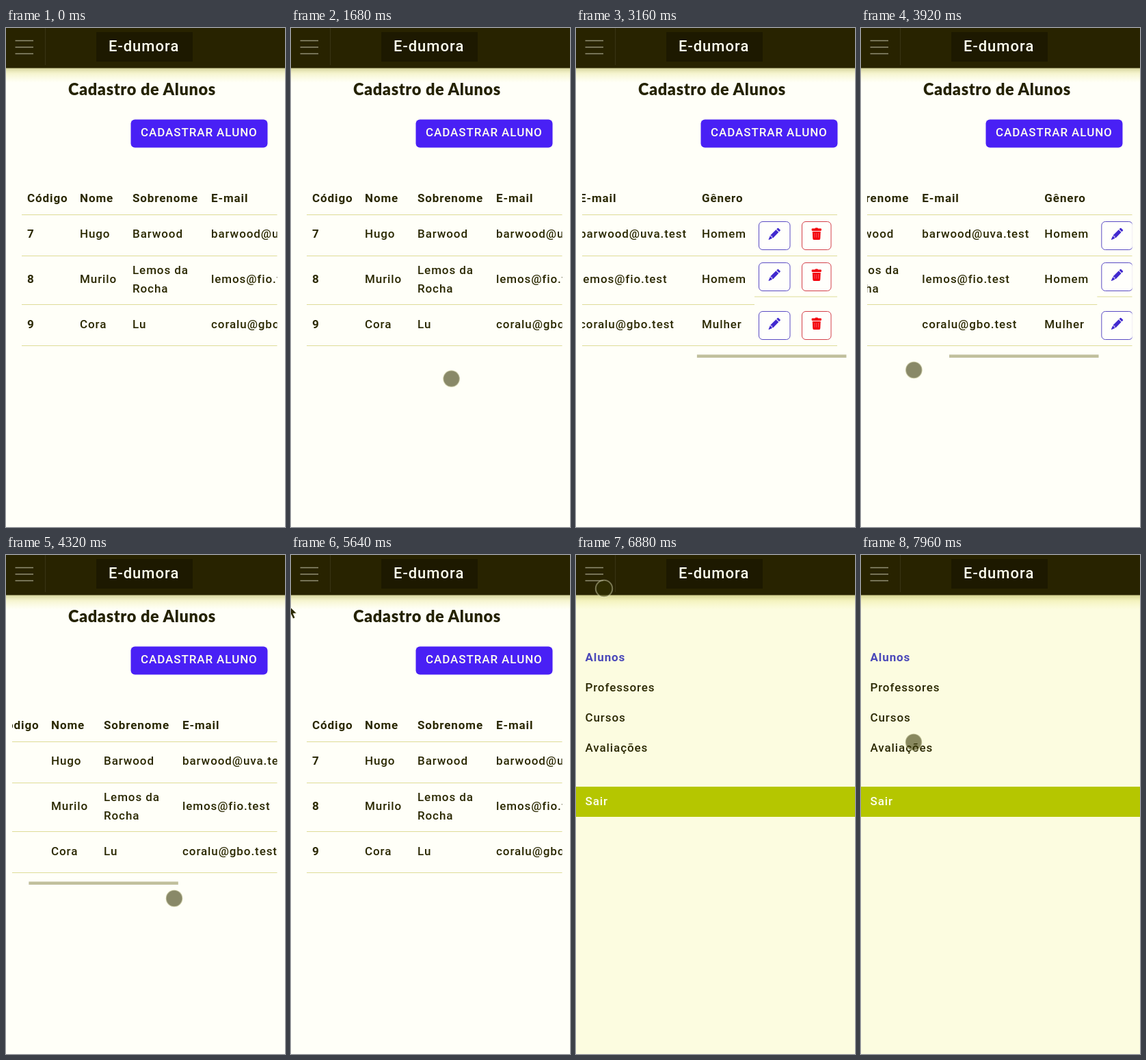
Animation of 408x728 px, one loop 8000 ms. Source, as an HTML page:

```html
<!DOCTYPE html>
<html lang="pt">
<head>
<meta charset="utf-8">
<title>Cadastro de Alunos</title>
<style>
  html, body { margin: 0; width: 100%; height: 100%; overflow: hidden; background: #fffff8; }
  svg { display: block; width: 100vw; height: 100vh; }
  text { font: 500 17px Roboto, Inter, sans-serif; letter-spacing: .9px; fill: #2a2800; white-space: pre; }
  .b { font-weight: 700; }
  .title { font: 900 23.5px Lato, sans-serif; letter-spacing: .6px; fill: #242200; }
  .brand { font-size: 22px; letter-spacing: 1px; fill: #fffff0; }
  .light { fill: #fffff0; }
  .active { font-weight: 700; fill: #4b49b9; }
  .rule { stroke: #dedc98; stroke-width: 1; }
</style>
</head>
<body>
<svg viewBox="0 0 408 728" preserveAspectRatio="none">
  <defs>
    <clipPath id="tableClip"><rect x="9" y="230" width="387.5" height="240"/></clipPath>
    <clipPath id="menuClip"><rect id="menuRect" width="408" height="0"/></clipPath>
    <linearGradient id="shade" x2="0" y2="1">
      <stop offset="0" stop-color="#a5a23c" stop-opacity=".5"/>
      <stop offset=".4" stop-color="#dcd860" stop-opacity=".26"/>
      <stop offset="1" stop-color="#f0ec80" stop-opacity="0"/>
    </linearGradient>
    <g id="pencil" fill="#4129cf">
      <path d="M12.1.4a.8.8 0 0 1 1.1 0l2.4 2.4a.8.8 0 0 1 0 1.1L14.2 5.3 10.7 1.8z"/>
      <path d="M10 2.5 13.5 6 6.2 13.3 5 12.9V11H3.1L2.7 9.8z"/>
      <path d="M2.2 10.5 2.5 11.7H4.3V13.5L5.5 13.8.5 15.8Q0 15.9.2 15.3z"/>
    </g>
    <g id="trash">
      <path fill="#f3000c" d="M2.5 1a1 1 0 0 0-1 1v1a1 1 0 0 0 1 1h11a1 1 0 0 0 1-1V2a1 1 0 0 0-1-1H10a1 1 0 0 0-1-1H7a1 1 0 0 0-1 1zM2.6 5h10.8l-.4 9a2 2 0 0 1-2 2H5a2 2 0 0 1-2-2z"/>
      <path stroke="#fff" stroke-width=".6" opacity=".5" d="M5.5 7v6M8 7v6M10.5 7v6"/>
    </g>
  </defs>

  <rect width="408" height="728" fill="#fffff8"/>
  <text class="title" x="91" y="98">Cadastro de Alunos</text>
  <rect x="182.5" y="133.5" width="200" height="41" rx="6" fill="#4920f5"/>
  <text class="light" x="197" y="158">CADASTRAR ALUNO</text>

  <g clip-path="url(#tableClip)"><g id="table"></g></g>
  <rect id="thumb" y="476.5" width="218.5" height="4.5" fill="#c1c09d" opacity="0"/>

  <g id="menu" clip-path="url(#menuClip)">
    <rect width="408" height="728" fill="#fcfce0"/>
    <rect y="338" width="408" height="44" fill="#b5c600"/>
  </g>

  <rect y="58" width="408" height="22" fill="url(#shade)"/>
  <rect width="408" height="58.5" fill="#282300"/>
  <rect x="132" y="6" width="141" height="43" fill="#1d1900"/>
  <path d="M57.5 0V54" stroke="#393414"/>
  <path d="M13.5 18.5h26.5M13.5 28h26.5M13.5 37.5h26.5" stroke="#918e74" stroke-width="1.7"/>
  <text class="brand" x="150" y="33.5">E-dumora</text>

  <circle id="touch" r="12.2" fill="#343400" fill-opacity=".58" stroke="#ffffdc" stroke-opacity=".38" stroke-width="2"/>
  <path id="arrow" d="M0 0V17L4 13.4 7 20 10 18.6 7.2 12.4 12.3 12z" fill="#2a2800" stroke="#fffff0" stroke-width=".8"/>
</svg>
<script>
const LOOP = 8000, STEP = 40, MAX_SCROLL = 295;
const $ = id => document.getElementById(id);

function add(parent, tag, attrs, content) {
  const el = document.createElementNS('http://www.w3.org/2000/svg', tag);
  for (const k in attrs) el.setAttribute(k, attrs[k]);
  if (content) el.textContent = content;
  parent.appendChild(el);
  return el;
}

const table = $('table'), menu = $('menu');
const COLS = [31, 108, 185, 300, 479];

function label(parent, x, y, content, cls = '') {
  add(parent, 'text', { x, y, class: cls }, content);
}
function rule(x1, x2, y) {
  add(table, 'line', { x1, x2, y1: y, y2: y, class: 'rule' });
}
function action(x, y, w, color, icon) {
  add(table, 'rect', { x, y, width: w, height: 41, rx: 5.5, fill: '#fffffc', stroke: color });
  add(table, 'use', { href: icon, transform: `translate(${x + w / 2 - 8.8} ${y + 9}) scale(1.1)` });
}

['Código', 'Nome', 'Sobrenome', 'E-mail', 'Gênero']
  .forEach((s, i) => label(table, COLS[i], 253.5, s, 'b'));

const ROWS = [
  [306, 282, '7', 'Hugo', ['Barwood'], 'barwood@uva.test', 'Homem'],
  [372, 342, '8', 'Murilo', ['Lemos da', 'Rocha'], 'lemos@fio.test', 'Homem'],
  [438, 413, '9', 'Cora', ['Lu'], 'coralu@gbo.test', 'Mulher']
];
for (const [y, top, code, first, last, mail, gender] of ROWS) {
  label(table, COLS[0], y, code, 'b');
  label(table, COLS[1], y, first);
  last.forEach((s, i) => label(table, COLS[2], y + (i - (last.length - 1) / 2) * 27, s));
  label(table, COLS[3], y, mail);
  label(table, COLS[4], y, gender);
  action(562.5, top + .5, 45.5, '#5a4bc4', '#pencil');
  action(625.5, top + .5, 42.5, '#d3404a', '#trash');
}
rule(23, 677, 272.5);
rule(23, 677, 332.5);
rule(23, 556, 403.5);
rule(556, 677, 392);
rule(23, 677, 463.5);

label(menu, 13.5, 154.5, 'Alunos', 'active');
['Professores', 'Cursos', 'Avaliações'].forEach((s, i) => label(menu, 13.5, 199 + i * 44, s));
label(menu, 13.5, 365, 'Sair', 'light');

// time, x, y
const PATH = [
  [960, 422, 157], [1040, 404, 158], [1240, 300, 300], [1480, 147, 560], [1640, 220, 520],
  [1840, 293, 478], [2040, 293, 478], [2440, 185, 476], [2640, 120, 478], [3000, -2, 492],
  [3080, -22, 492], [3560, -22, 496], [3720, -7, 498], [4320, 246, 501], [4480, 288, 503],
  [4640, 340, 470], [4840, 395, 350], [5160, 350, 202], [5240, 332, 190], [5560, 8, 95],
  [5600, -22, 85], [5680, -22, 70], [5760, 14, 40], [5920, 27, 28], [6280, 27, 28],
  [6480, 29, 30], [6880, 41, 49], [7120, 42, 54], [7280, 14, 150], [7560, 117, 434],
  [7760, 80, 300], [7920, 60, 172], [7960, 77, 273]
];
const THUMB = [[2000, 0], [2080, 1], [3280, 1], [3480, 0], [3680, 0], [3760, 1], [4800, 1], [5040, 0]];

function sample(keys, t, i = 1) {
  if (t <= keys[0][0]) return keys[0][i];
  for (let n = 1; n < keys.length; n++) {
    const a = keys[n - 1], b = keys[n];
    if (t <= b[0]) return a[i] + (b[i] - a[i]) * (t - a[0]) / (b[0] - a[0]);
  }
  return keys[keys.length - 1][i];
}
const clamp = (v, hi) => Math.max(0, Math.min(hi, v));

// The table follows the finger one to one during each drag.
function scrollAt(t, x) {
  if (t < 2040 || t >= 4480) return 0;
  if (t < 3080) return clamp(293 - x, MAX_SCROLL);
  if (t < 3720) return MAX_SCROLL;
  return clamp(288 - x, MAX_SCROLL);
}

function draw(t) {
  const x = sample(PATH, t), y = sample(PATH, t, 2);
  const scroll = scrollAt(t, x);
  table.setAttribute('transform', `translate(${-scroll} 0)`);
  $('thumb').setAttribute('x', 9.5 + scroll * 387 / 682);
  $('thumb').setAttribute('opacity', sample(THUMB, t));
  $('touch').setAttribute('transform', `translate(${x} ${y})`);

  const outside = t >= 5600 && t < 5720;
  $('arrow').setAttribute('transform', `translate(${outside ? -4 : -40} ${73 - (t - 5640) / 8})`);

  const p = clamp((t - 6440) / 350, 1);
  $('menuRect').setAttribute('height', 728 * p * p * (3 - 2 * p));
}

const start = performance.now();
function frame() {
  const t = (performance.now() - start) % LOOP;
  draw(Math.floor(t / STEP) * STEP);
  requestAnimationFrame(frame);
}
draw(0);
requestAnimationFrame(frame);
</script>
</body>
</html>
```
